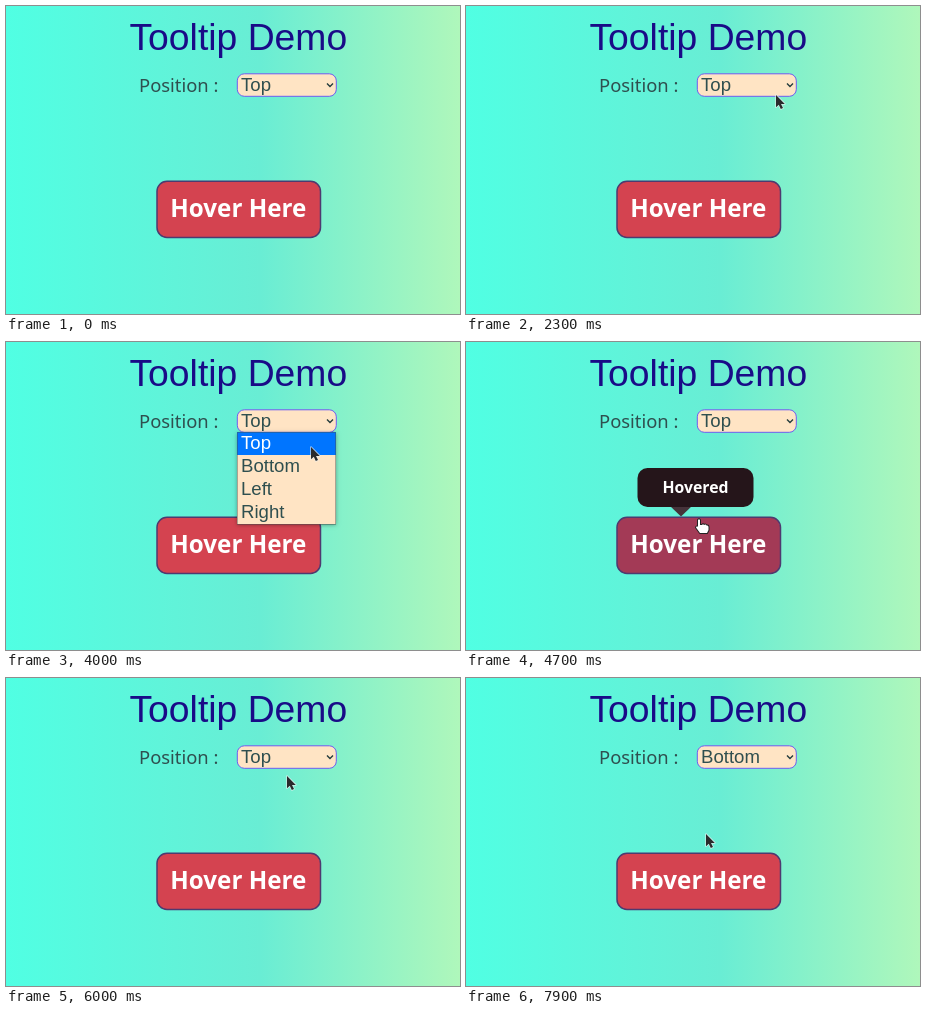
An HTML page with a canvas that plays this animation: 454 by 308 pixels, repeating every 8000 ms.

```html
<!DOCTYPE html>
<html lang="en">
<head>
<meta charset="utf-8">
<title>Tooltip Demo</title>
<style>
  html, body { margin: 0; width: 100%; height: 100%; overflow: hidden; }
  canvas { display: block; width: 454px; height: 308px; }
</style>
</head>
<body>
<canvas id="stage" width="454" height="308"></canvas>
<script>
const ctx = document.getElementById('stage').getContext('2d');
const LOOP = 8000, STEP = 100;
const SANS = '"Liberation Sans", Arial, sans-serif';
const HUMAN = '"Noto Sans", "Open Sans", sans-serif';
const OPTION_FONT = '18.6px ' + SANS;
const SLATE = '#2f4f4f', BISQUE = '#ffe4c4', BLUE = '#0075ff';
const OPTIONS = ['Top', 'Bottom', 'Left', 'Right'];
const MENU = { x: 231, y: 90, w: 99, row: 23 };
const BUTTON = { x: 151, y: 175.3, w: 163.5, h: 56.2 };

// The pointer eases from one stop to the next
const STOPS = [
  { t: 1400, x: -4, y: 150 },
  { t: 2300, x: 310, y: 89 },
  { t: 4000, x: 305, y: 105 },
  { t: 4700, x: 235, y: 178 },
  { t: 5400, x: 234, y: 190 },
  { t: 6000, x: 281, y: 98 },
  { t: 6900, x: 272, y: 100 },
  { t: 7600, x: 294, y: 129 },
  { t: 7800, x: 294, y: 129 },
  { t: 7900, x: 240, y: 156 }
];

const bg = ctx.createLinearGradient(0, 0, 454, 0);
bg.addColorStop(0, '#50ffe3');
bg.addColorStop(0.56, '#69edd4');
bg.addColorStop(1, '#aff7bb');

const smooth = k => k * k * (3 - 2 * k);
const mix = (a, b, k) => a + (b - a) * k;
const between = (t, from, to) => t >= from && t < to;

function pointerAt(t) {
  if (t < STOPS[0].t) return null;
  const i = STOPS.findIndex(s => s.t > t);
  if (i < 0) return STOPS[STOPS.length - 1];
  const a = STOPS[i - 1], b = STOPS[i];
  const k = smooth((t - a.t) / (b.t - a.t));
  return { x: mix(a.x, b.x, k), y: mix(a.y, b.y, k) };
}

function text(str, x, y, font, color, align = 'left') {
  ctx.font = font;
  ctx.fillStyle = color;
  ctx.textAlign = align;
  ctx.fillText(str, x, y);
}

function box(x, y, w, h, r, fill, stroke, line) {
  ctx.beginPath();
  ctx.roundRect(x, y, w, h, r);
  ctx.fillStyle = fill;
  ctx.fill();
  if (!stroke) return;
  ctx.strokeStyle = stroke;
  ctx.lineWidth = line;
  ctx.stroke();
}

function shape(d, fill, stroke, line) {
  const path = new Path2D(d);
  ctx.lineJoin = 'round';
  ctx.strokeStyle = stroke;
  ctx.lineWidth = line;
  ctx.stroke(path);
  ctx.fillStyle = fill;
  ctx.fill(path);
}

function drawSelect(value) {
  box(231.3, 67.8, 99, 22.5, 7, BISQUE, '#6d5cf0', 1);
  text(value, 235, 85, OPTION_FONT, SLATE);
  ctx.beginPath();
  ctx.moveTo(321, 77.5);
  ctx.lineTo(324, 80.5);
  ctx.lineTo(327, 77.5);
  ctx.strokeStyle = '#243c3c';
  ctx.lineWidth = 1.4;
  ctx.stroke();
}

function drawMenu(pointerY) {
  const { x, y, w, row } = MENU;
  const active = Math.floor((pointerY - y) / row);
  const picked = Math.max(0, Math.min(OPTIONS.length - 1, active));
  const h = row * OPTIONS.length;
  ctx.save();
  ctx.shadowColor = 'rgba(0,0,0,.35)';
  ctx.shadowBlur = 4;
  ctx.shadowOffsetY = 1;
  box(x, y, w, h, 0, BISQUE);
  ctx.restore();
  box(x, y + picked * row, w, row, 0, BLUE);
  OPTIONS.forEach((name, i) =>
    text(name, x + 4, y + 17 + i * row, OPTION_FONT, i === picked ? '#fff' : SLATE));
  ctx.strokeStyle = 'rgba(70,80,80,.45)';
  ctx.lineWidth = 1;
  ctx.strokeRect(x + 0.5, y + 0.5, w - 1, h);
}

function drawButton(hover) {
  const { x, y, w, h } = BUTTON;
  box(x, y, w, h, 10, hover ? '#a33a56' : '#d44350', '#4d3a70', 1.5);
  text('Hover Here', 232.3, 211.3, 'bold 24.2px ' + HUMAN, '#fff', 'center');
}

function drawTooltip() {
  ctx.beginPath();
  ctx.moveTo(204, 164);
  ctx.lineTo(226, 164);
  ctx.lineTo(215, 174.5);
  ctx.fillStyle = '#46333a';
  ctx.fill();
  box(171.5, 126, 116, 39, 10, '#25151a');
  text('Hovered', 229.5, 151, 'bold 15.8px ' + HUMAN, '#fff', 'center');
}

function drawPointer({ x, y }, hand) {
  ctx.save();
  ctx.translate(x, y);
  if (hand) {
    shape('M-3 0Q-2-1.5-1 0V5H1Q2 3.5 3 5Q5 4 5.5 5.5Q7.5 5 7.5 7V10L6 13H-1L-5 7.5Q-4 5.5-3 7Z',
      '#fff', '#222', 2);
  } else {
    shape('M0 0V12.2L2.8 9.7L4.8 14L7 13L5 8.9H8.8Z', '#2a2a2c', 'rgba(235,240,240,.75)', 1.5);
  }
  ctx.restore();
}

function isOver({ x, y, w, h }, p) {
  return between(p.x, x, x + w) && between(p.y, y, y + h);
}

function draw(t) {
  const pointer = pointerAt(t);
  const open = between(t, 2600, 4200) || between(t, 6300, 7600);
  const hover = pointer && !open && isOver(BUTTON, pointer);
  ctx.fillStyle = bg;
  ctx.fillRect(0, 0, 454, 308);
  text('Tooltip Demo', 232.3, 44, '37.3px ' + SANS, '#190b87', 'center');
  text('Position :', 133, 85.5, '18.4px ' + HUMAN, SLATE);
  drawSelect(t < 7600 ? 'Top' : 'Bottom');
  drawButton(hover);
  if (hover) drawTooltip();
  if (open) drawMenu(pointer.y);
  if (pointer) drawPointer(pointer, hover);
}

// The screen advances ten times a second
function tick() {
  const t = performance.now() % LOOP;
  draw(Math.floor(t / STEP) * STEP);
  requestAnimationFrame(tick);
}
tick();
</script>
</body>
</html>
```
